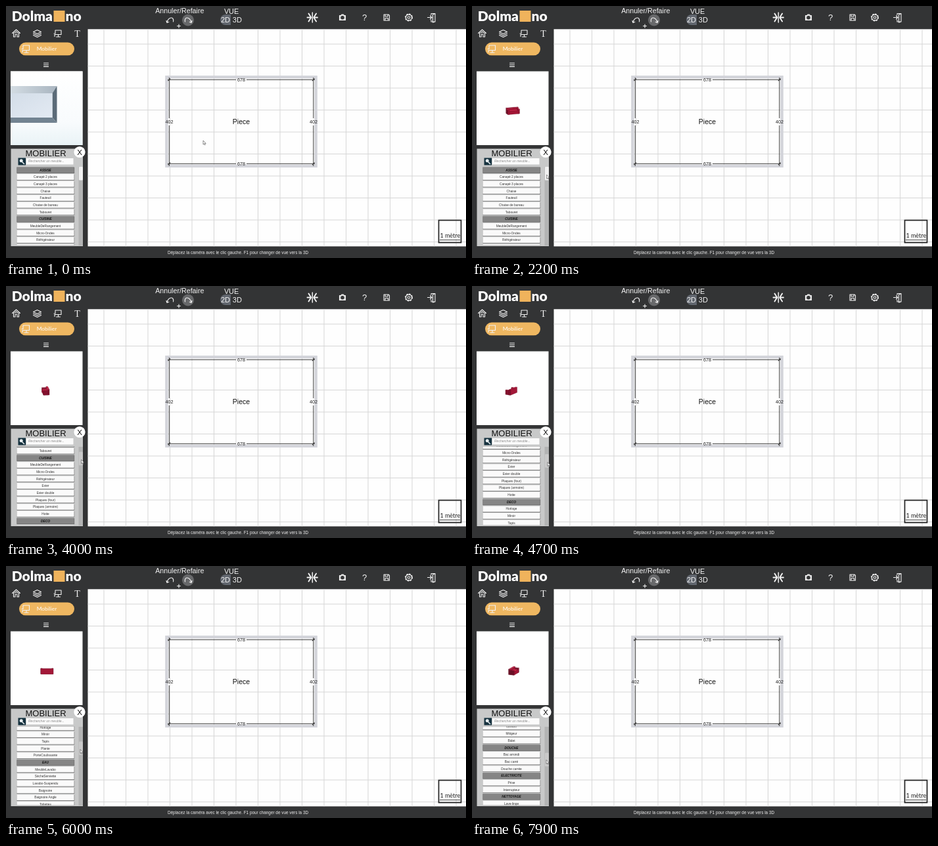
Recreate the animation shown at these times as an HTML page. Size 700 by 384 pixels, loop 8 s.

```html
<!DOCTYPE html>
<html lang="fr">
<head>
<meta charset="utf-8">
<title>Plan de pièce</title>
<style>
  html, body { margin: 0; width: 100%; height: 100%; overflow: hidden; background: #333435; }
  svg { display: block; width: 700px; height: 384px; font-family: "Liberation Sans", Arial, sans-serif; }
  .mid { text-anchor: middle; }
  .icon { fill: none; stroke: #f2f2f2; stroke-width: 1.1; stroke-linejoin: round; stroke-linecap: round; }
  .soft { font-family: Lato, sans-serif; }
</style>
</head>
<body>
<svg viewBox="0 0 700 384">
  <defs>
    <clipPath id="listClip"><rect x="8" y="244.5" width="102" height="120"/></clipPath>
    <clipPath id="viewClip"><rect x="7" y="99.5" width="109.5" height="112.5"/></clipPath>
    <linearGradient id="sky" x2="0" y2="1">
      <stop offset="0" stop-color="#fff"/><stop offset=".7" stop-color="#f8fbfd"/><stop offset="1" stop-color="#e9f3f6"/>
    </linearGradient>
    <linearGradient id="ledge" x2="1" y2="0">
      <stop offset="0" stop-color="#d3dce3"/><stop offset="1" stop-color="#a9b5c0"/>
    </linearGradient>
    <linearGradient id="pane" x2="1" y2="1">
      <stop offset="0" stop-color="#d3dde8"/><stop offset="1" stop-color="#e3eaf3"/>
    </linearGradient>
  </defs>
  <rect width="700" height="384" fill="#333435"/>

  <!-- plan -->
  <rect x="124.5" y="35.3" width="575.5" height="331" fill="#fefefe"/>
  <path id="grid" stroke="#d6d6d6" fill="none"/>
  <rect x="244.4" y="108.3" width="227.2" height="135.6" fill="none" stroke="#d3d4da" stroke-width="4.4"/>
  <g id="dims" stroke="#3c3c3c" fill="none"></g>
  <g font-size="7.2" class="mid" fill="#222">
    <text x="358" y="115.2">678</text><text x="358" y="243.2">678</text>
    <text x="248.5" y="179.2">402</text><text x="468" y="179.2">402</text>
  </g>
  <text x="358" y="180.3" font-size="10.5" class="mid" fill="#111">Piece</text>
  <rect x="658.5" y="326.5" width="34" height="34" fill="none" stroke="#222" stroke-width="1.7"/>
  <path d="M660 356.5H691" stroke="#333" stroke-width=".9"/>
  <text x="675.8" y="353.3" font-size="9" class="mid soft" fill="#222">1 mètre</text>

  <!-- header -->
  <g font-family="Lato, sans-serif" font-weight="900" font-size="21" fill="#fff">
    <text x="71" y="22.5" text-anchor="end">Dolma</text><text x="90.5" y="22.5">no</text>
  </g>
  <rect x="72.5" y="7" width="17" height="17" fill="#efb35c"/>
  <g fill="#f4f4f4" class="mid">
    <text x="264.3" y="11.3" font-size="10.7">Annuler/Refaire</text>
    <text x="343" y="12" font-size="10.8">VUE</text>
  </g>
  <circle cx="277" cy="21.5" r="9" fill="#68696b"/>
  <path d="M334 13H342V29H334A8 8 0 0 1 334 13Z" fill="#62676f"/>
  <g fill="#f4f4f4" class="mid" font-size="11">
    <text x="334" y="25.3">2D</text><text x="351.8" y="25.3">3D</text>
  </g>
  <g class="icon">
    <path d="M245 25C246 20.5 249 17.5 252 18C254.5 18.5 255 21.5 254.5 24M244 22.5L245 25.5L247.8 24.3"/>
    <path d="M282 25C281 20.5 278 17.5 275 18C272.5 18.5 272 21.5 272.5 24M283 22.5L282 25.5L279.2 24.3"/>
    <path d="M260.5 30.5H265.5M263 28V33"/>
    <path d="M466.3 10V25" stroke-width="1.5"/>
    <path d="M460.5 11.5L464.3 17.5L460.5 23.5M472.1 11.5L468.3 17.5L472.1 23.5M458.5 17.5H463M469.6 17.5H474" stroke-width="1.9"/>
    <path d="M507.5 14.5H509.8L510.8 13H513.5L514.5 14.5H516.5V21.5H507.5Z" fill="#d8d8d8"/>
    <circle cx="512" cy="17.8" r="2.2" fill="#333435" stroke="#333435"/>
    <path d="M575 13H582L583.5 14.5V22H575ZM577 13V16H581V13M577 22V18.5H581.5V22"/>
    <circle cx="613" cy="17.5" r="4.4"/><circle cx="613" cy="17.5" r="1.8"/>
    <circle cx="613" cy="17.5" r="5.3" stroke-dasharray="1.8 2.36" stroke-width="1.3"/>
    <path d="M647 14V11.5H653V24H647V21M653 11.5L649.5 13V25L653 24M641.5 17.5H648M645.5 15L648 17.5L645.5 20"/>
  </g>
  <text x="545.5" y="22" font-size="13" class="mid" fill="#f4f4f4">?</text>

  <!-- tool column -->
  <g class="icon">
    <path d="M9.5 41.5L15.5 36L21.5 41.5M11.5 41V47H14V43H17V47H19.5V41M13 41L15.5 39L18 41"/>
    <path d="M41.5 39.5L47.5 36.5L53.5 39.5L47.5 42.5ZM41.5 42L47.5 45L53.5 42M41.5 44.5L47.5 47.5L53.5 44.5"/>
    <path d="M75 42V37H84V43.5H74V46.5M79.5 43.5V47M76.5 47H82.5M73 42H75"/>
  </g>
  <text x="108.5" y="46.5" font-size="14" class="mid" fill="#f4f4f4" font-family="Liberation Serif, serif">T</text>
  <rect x="20" y="55.5" width="84" height="19.8" rx="9.9" fill="#efb761"/>
  <path class="icon" d="M26 65.5V60H35.5V67.5H25V70.5M31 67.5V71M28 71H34M24 65.5H26"/>
  <text x="62" y="68.4" font-size="8.4" class="mid soft" fill="#fff">Mobilier</text>
  <path class="icon" d="M57.5 87H64.5M57.5 89.7H64.5M57.5 92.4H64.5"/>

  <!-- preview -->
  <rect x="7" y="99.5" width="109.5" height="112.5" fill="#fff"/>
  <g id="closeup" clip-path="url(#viewClip)">
    <rect x="7" y="99" width="110" height="113" fill="url(#sky)"/>
    <path d="M7 122H77.5L70.5 133H7Z" fill="url(#ledge)"/>
    <path d="M77.5 122V178L70.5 170V133Z" fill="#5b6b78"/>
    <path d="M7 170H70.5L77.5 178H7Z" fill="#728391"/>
    <rect x="7" y="133" width="63.5" height="37" fill="url(#pane)"/>
  </g>
  <g id="sofa" stroke-width=".25" stroke-linejoin="round"></g>

  <!-- furniture panel -->
  <rect x="7.5" y="217.5" width="109.5" height="148.5" fill="#c8c9c9"/>
  <text x="60.5" y="228.6" font-size="13" class="mid" fill="#111">MOBILIER</text>
  <circle cx="112" cy="222.5" r="8.6" fill="#fff"/>
  <text x="112" y="226.6" font-size="11.5" class="mid" fill="#111">X</text>
  <rect x="18.5" y="231.5" width="11.5" height="11" fill="#16323f"/>
  <path d="M24.5 237.5L28 241" stroke="#e8eef0" stroke-width="1.5"/>
  <circle cx="23.2" cy="235.8" r="2.5" fill="#e8eef0"/>
  <rect x="31" y="232" width="71.5" height="9.5" fill="#fbfbfb"/>
  <text x="34" y="238.4" font-size="5" font-style="italic" fill="#8a8a8a">Rechercher un meuble...</text>
  <g clip-path="url(#listClip)"><g id="list" font-size="4.8" class="mid"></g></g>
  <rect x="110.5" y="245" width="6.5" height="120" fill="#b3b4b4"/>
  <rect id="thumb" x="111" y="245" width="6" height="20.5" rx="1"/>

  <text x="353" y="377.6" font-size="6.4" class="mid" fill="#eee">Déplacez la caméra avec le clic gauche. F1 pour changer de vue vers la 3D</text>
  <path id="cursor" d="M0 0V6L1.4 4.8L2.4 6.8L3.3 6.3L2.4 4.4H4.2Z" fill="#fff" stroke="#444" stroke-width=".6"/>
</svg>
<script>
const $ = id => document.getElementById(id);
const NS = "http://www.w3.org/2000/svg";
function add(parent, tag, attrs, text) {
  const el = document.createElementNS(NS, tag);
  for (const k in attrs) el.setAttribute(k, attrs[k]);
  if (text) el.textContent = text;
  return parent.appendChild(el);
}

// one-metre grid, laid out from the middle of the stage
const METRE = 33.5;
let d = "";
for (let x = 350 - 6 * METRE; x < 700; x += METRE) d += `M${x.toFixed(1)} 35.3V366.3`;
for (let y = 192 - 4 * METRE; y < 366; y += METRE) d += `M124.5 ${y.toFixed(1)}H700`;
$("grid").setAttribute("d", d);

// dimension lines
for (const y of [112.3, 240.3])
  add($("dims"), "path", { d: `M246 ${y}H350M366 ${y}H470` });
for (const x of [248.3, 467.8]) {
  add($("dims"), "path", { d: `M${x} 109V171M${x} 182V244` });
  for (const y of [112.3, 240.3])
    add($("dims"), "path", { d: `M${x - 1.8} ${y + 1.8}L${x + 1.8} ${y - 1.8}`, "stroke-width": 1.2 });
}

// furniture list; a leading # marks a category
const PITCH = 10.67;
const items = `#ASSISE|Canapé 2 places|Canapé 3 places|Chaise|Fauteuil|Chaise de bureau|Tabouret
|#CUISINE|MeubleDeRangement|Micro-Ondes|Réfrigérateur|Evier|Evier double|Plaques (four)|Plaques (armoire)|Hotte
|#DECO|Horloge|Miroir|Tapis|Plante|PorteCoulissante
|#EAU|MeubleLavabo|SècheServiette|Lavabo-Suspendu|Baignoire|Baignoire Angle|Toilettes|Toilettes suspendues|Lavabo|Mitigeur|Bidet
|#DOUCHE|Bac arrondi|Bac carré|Douche carrée|#ELECTRICITE|Prise|Interrupteur
|#NETTOYAGE|Lave-linge|Sèche-linge`.replace(/\n/g, "").split("|");
items.forEach((name, i) => {
  const y = 250 + i * PITCH, head = name[0] === "#";
  add($("list"), "rect", { x: 16.4, y: y - 4.2, width: 87.8, height: 9.2, fill: "#6d6d6d" });
  add($("list"), "rect", { x: 16.4, y: y - 4.6, width: 87.2, height: 8.8, fill: head ? "#858585" : "#fafafa" });
  add($("list"), "text", {
    x: 60, y: y + 1.6, fill: head ? "#111" : "#333",
    "font-weight": head ? "bold" : "normal", "font-style": head ? "italic" : "normal"
  }, name.replace("#", ""));
});

// sofa made of boxes: x0, x1, y0, y1, z0, z1
const BOXES = [
  [-7.5, 7.5, 0, 5, -3, 4.5],
  [-9.5, 9.5, 0, 8.5, -4.5, -2],
  [-9.5, -7.2, 0, 7, -2, 4.5],
  [7.2, 9.5, 0, 7, -2, 4.5]
];
const TILT = 0.26;
function drawSofa(angle, cx) {
  const a = angle * Math.PI / 180, c = Math.cos(a), s = Math.sin(a);
  const depth = (x, z) => x * s + z * c;
  const point = (x, y, z) =>
    `${(cx + x * c - z * s).toFixed(2)},${(163.8 - y * Math.cos(TILT) + depth(x, z) * Math.sin(TILT)).toFixed(2)}`;
  const faces = [];
  for (const [x0, x1, y0, y1, z0, z1] of BOXES) {
    const mx = (x0 + x1) / 2, mz = (z0 + z1) / 2, my = (y0 + y1) / 2;
    const face = (pts, x, y, z, fill) => faces.push({
      key: depth(x, z) * Math.cos(TILT) + y * Math.sin(TILT),
      pts: pts.map(p => point(...p)).join(" "), fill
    });
    const side = (x, fill) => face([[x, y0, z0], [x, y1, z0], [x, y1, z1], [x, y0, z1]], x, my, mz, fill);
    const front = (z, fill) => face([[x0, y0, z], [x1, y0, z], [x1, y1, z], [x0, y1, z]], mx, my, z, fill);
    if (s > 0) side(x1, "#84112e"); else side(x0, "#6b1026");
    if (c > 0) front(z1, "#a31535"); else front(z0, "#a31838");
    face([[x0, y1, z0], [x1, y1, z0], [x1, y1, z1], [x0, y1, z1]], mx, y1, mz, "#c92448");
  }
  faces.sort((p, q) => p.key - q.key);
  $("sofa").replaceChildren();
  for (const f of faces) add($("sofa"), "polygon", { points: f.pts, fill: f.fill, stroke: "#5a0d20" });
}

// linear tracks: time, value(s)
function track(keys, t) {
  let i = 1;
  while (i < keys.length - 1 && keys[i][0] < t) i++;
  const p = keys[i - 1], q = keys[i];
  const k = Math.min(1, Math.max(0, (t - p[0]) / (q[0] - p[0])));
  return p.slice(1).map((v, n) => v + (q[n + 1] - v) * k);
}
const SCROLL = [[0, 0], [2300, 0], [3000, 21.5], [4700, 91.5], [6000, 185.3], [7000, 243], [7900, 325.2]];
const POINTER = [[0, 300, 205], [200, 285, 209], [800, 95, 258], [1200, 102, 251], [1900, 113.5, 256.5],
  [3000, 114, 259], [4700, 115, 268.5], [6000, 113, 279.5], [7000, 113, 286.5], [7900, 113, 295.5]];
const SPIN = [[700, -100, 63.5], [1200, -74, 63.5], [3000, 25, 61], [4700, 122, 59.8],
  [6000, 180, 62.5], [7000, 236, 64.5], [7900, 294, 63.5]];

const LOOP = 8000, STEP = 100, HOVER = 700, GRAB = 2300;
const start = performance.now();
let shown = -1;
function draw(t) {
  const [scroll] = track(SCROLL, t), [px, py] = track(POINTER, t);
  $("list").setAttribute("transform", `translate(0 ${-scroll})`);
  $("thumb").setAttribute("y", 245 + scroll / 8.2);
  $("thumb").setAttribute("fill", t < GRAB ? "#f1f1f1" : "#c9c9c9");
  $("cursor").setAttribute("transform", `translate(${px} ${py})`);
  $("closeup").style.display = t < HOVER ? "" : "none";
  $("sofa").style.display = t < HOVER ? "none" : "";
  if (t >= HOVER) drawSofa(...track(SPIN, t));
}
function frame() {
  const t = Math.floor((performance.now() - start) % LOOP / STEP) * STEP;
  if (t !== shown) draw(shown = t);
  requestAnimationFrame(frame);
}
frame();
</script>
</body>
</html>
```
